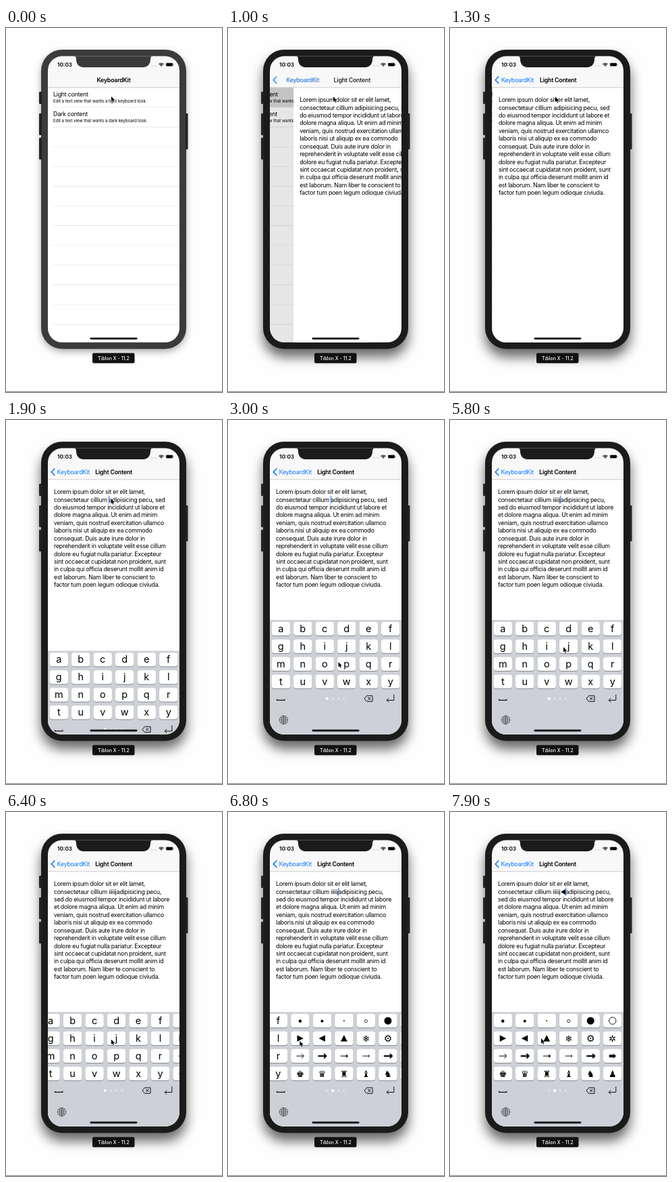
These frames come from a looping animation (320x537 px, 8 s). An HTML page with a canvas:

```html
<!DOCTYPE html>
<html lang="en">
<head>
<meta charset="utf-8">
<title>Keyboard demo</title>
<style>
html, body { margin: 0; width: 100%; height: 100%; overflow: hidden; background: #fefefe; }
canvas { display: block; width: 320px; height: 537px; }
</style>
</head>
<body>
<canvas id="stage"></canvas>
<script>
const LOOP = 8000;
const W = 320, H = 537;
const SCREEN = { x: 62, y: 41.6, w: 195, h: 422.2 };
const MID = 159.5;
const BODY = 8.84;
const BLUE = '#0a7aff';

const canvas = document.getElementById('stage');
const ctx = canvas.getContext('2d');
const dpr = window.devicePixelRatio || 1;
canvas.width = W * dpr;
canvas.height = H * dpr;

// Timeline, in ms
const ACTIVATE = 700, PUSH = 785, KEYBOARD_UP = 1723;
const DRAG_START = 6320, DRAG_END = 6600;
const EDITS = [3700, 3900, 4150, 4400, 4700, 5600, 7500];
const TYPED = 'iiiiij◀';
const POINTER = [
  [0, 156, 101], [1500, 156, 101.5], [1600, 155.5, 116], [1950, 155.5, 116],
  [2650, 163.5, 357], [3100, 163.5, 357], [3600, 138, 332], [5000, 138, 332],
  [5500, 168, 335], [DRAG_START, 168, 335], [DRAG_END, 108, 337], [7200, 101.5, 340],
  [7600, 101.5, 340], [7900, 135, 334]
];

const LINES = [
  'Lorem ipsum dolor sit er elit lamet,', '', '', '',
  'veniam, quis nostrud exercitation ullamco',
  'laboris nisi ut aliquip ex ea commodo',
  'consequat. Duis aute irure dolor in',
  'reprehenderit in voluptate velit esse cillum',
  'dolore eu fugiat nulla pariatur. Excepteur',
  'sint occaecat cupidatat non proident, sunt',
  'in culpa qui officia deserunt mollit anim id',
  'est laborum. Nam liber te conscient to',
  'factor tum poen legum odioque civiuda.'
];
const LETTERS = 'abcdefghijklmnopqrtuvwxy';

// Remaining distance (1 to 0) of a critically damped spring
function spring(ms) {
  const s = Math.max(0, ms) * 0.0145;
  return (1 + s) * Math.exp(-s);
}

const smooth = u => u * u * (3 - 2 * u);

function pointerAt(t) {
  const i = POINTER.findIndex(k => k[0] > t);
  if (i < 0) return POINTER.at(-1).slice(1);
  const [t0, x0, y0] = POINTER[i - 1], [t1, x1, y1] = POINTER[i];
  const u = smooth((t - t0) / (t1 - t0));
  return [x0 + (x1 - x0) * u, y0 + (y1 - y0) * u];
}

function setFont(size, weight, spacing) {
  ctx.font = `${weight} ${size}px Inter, "DejaVu Sans", sans-serif`;
  ctx.letterSpacing = spacing * size + 'px';
}

function text(str, x, y, { size = BODY, weight = 400, color = '#000', align = 'left', spacing = -0.027 } = {}) {
  setFont(size, weight, spacing);
  ctx.textAlign = align;
  ctx.fillStyle = color;
  ctx.fillText(str, x, y);
}

function box(x, y, w, h, r, color) {
  ctx.fillStyle = color;
  ctx.beginPath();
  ctx.roundRect(x, y, w, h, r);
  ctx.fill();
}

function stroke(d, color = '#111', width = 1) {
  ctx.strokeStyle = color;
  ctx.lineWidth = width;
  ctx.stroke(new Path2D(d));
}

function fill(d, color = '#000') {
  ctx.fillStyle = color;
  ctx.fill(new Path2D(d));
}

function disc(x, y, r, color = '#000') {
  ctx.fillStyle = color;
  ctx.beginPath();
  ctx.arc(x, y, r, 0, 7);
  ctx.fill();
}

function ring(x, y, r, width = 1) {
  ctx.strokeStyle = '#000';
  ctx.lineWidth = width;
  ctx.beginPath();
  ctx.arc(x, y, r, 0, 7);
  ctx.stroke();
}

function at(x, y, draw) {
  ctx.save();
  ctx.translate(x, y);
  draw();
  ctx.restore();
}

function withAlpha(alpha, draw) {
  ctx.save();
  ctx.globalAlpha = alpha;
  draw();
  ctx.restore();
}

function drawDevice(active) {
  const color = active ? '#1b1b1b' : '#3b3b3b';
  ctx.save();
  ctx.shadowColor = active ? 'rgba(0,0,0,.6)' : 'rgba(0,0,0,.32)';
  ctx.shadowBlur = (active ? 18 : 11) * dpr;
  ctx.shadowOffsetY = (active ? 12 : 4) * dpr;
  box(52, 32, 215, 441.4, 31, color);
  ctx.restore();
  box(49, 94, 4, 18, 1, '#222');
  box(49, 126, 4, 32, 1, '#222');
  box(49, 162, 4, 32, 1, '#222');
  box(266, 126, 3.5, 53, 1, '#222');
  return color;
}

function drawStatus(color) {
  fill('M100 41H218C215 42 214 43 214 46C214 53 210 58 203 58H115C108 58 104 53 104 46C104 43 103 42 100 41Z', color);
  text('10:03', 76, 57, { size: 8.2, weight: 600, spacing: 0 });
  for (let i = 0; i < 4; i++) disc(215.3 + i * 2.3, 55.8, 0.6, '#aaa');
  ctx.strokeStyle = '#000';
  ctx.lineWidth = 1.2;
  for (const r of [1, 3, 5]) {
    ctx.beginPath();
    ctx.arc(230, 57, r, -Math.PI * 0.75, -Math.PI * 0.25);
    ctx.stroke();
  }
  box(236.8, 51.3, 10.6, 5.4, 1.4, '#888');
  box(237.4, 51.9, 9.4, 4.2, 1, '#000');
  box(247.8, 53, 0.8, 2, 0.4, '#888');
}

function drawList(pressed) {
  box(62, 88, 195, 376, 0, '#fff');
  if (pressed) box(62, 88, 195, 29, 0, '#d9d9d9');
  for (let i = 1; i <= 12; i++) box(70, 87.6 + i * 29.1, 187, 0.6, 0, '#dededf');
  ['light', 'dark'].forEach((look, i) => {
    const y = 101 + i * 29.1;
    text(look[0].toUpperCase() + look.slice(1) + ' content', 70, y);
    text(`Edit a text view that wants a ${look} keyboard look.`, 70, y + 9, { size: 6.24, spacing: -0.01 });
  });
}

function drawEditor(t) {
  box(62, 88, 195, 376, 0, '#fff');
  const count = EDITS.filter(e => e <= t).length;
  const wrapped = count >= 4;
  const before = 'consectetaur cillium ' + TYPED.slice(0, count);
  const lines = LINES.slice();
  lines[1] = before + 'adipisicing pecu,' + (wrapped ? '' : ' sed');
  lines[2] = (wrapped ? 'sed ' : '') + 'do eiusmod tempor incididunt ut labore' + (wrapped ? '' : ' et');
  lines[3] = (wrapped ? 'et ' : '') + 'dolore magna aliqua. Ut enim ad minim';
  lines.forEach((line, i) => text(line, 71, 109.2 + i * 11.42));

  const lastEdit = count ? EDITS[count - 1] : KEYBOARD_UP;
  if (t >= KEYBOARD_UP && (t - lastEdit) % 1000 < 550) {
    box(71 + ctx.measureText(before).width - 0.3, 111.5, 1.1, 12, 0.4, '#3f70ee');
  }
}

function drawNavBar(remaining) {
  box(62, 41, 195, 47, 0, '#f8f8f8');
  box(62, 87.6, 195, 0.6, 0, '#bdbdc0');
  const shown = 1 - remaining;
  withAlpha(remaining, () =>
    text('KeyboardKit', MID - 58 * shown, 79.5, { weight: 600, align: 'center' }));
  withAlpha(shown, () => {
    stroke('M72.4 71.5L67.2 76.7L72.4 81.9', BLUE, 1.6);
    text('KeyboardKit', 75.6 + 58 * remaining, 79.6, { color: BLUE });
    text('Light Content', MID + 135 * remaining, 79.5, { weight: 600, align: 'center' });
  });
}

function arrow(length, width, head) {
  const e = length / 2;
  stroke(`M${-e} 0H${e - 0.5}M${e - head} ${-head}L${e} 0L${e - head} ${head}`, '#000', width);
}

const glyph = (char, size = 13) => () =>
  text(char, 0, size * 0.36, { size, align: 'center', spacing: 0 });

const SYMBOLS = [
  () => disc(0, 0.5, 2.2),
  () => disc(0, 0.5, 2),
  () => disc(0, 0, 0.9),
  () => ring(0, 0.5, 2.1, 0.8),
  () => disc(0, 0, 5.5),
  () => ring(0, 0, 5.2, 0.9),
  () => fill('M-4.5 -4.7L5 0L-4.5 4.7Z'),
  () => fill('M4.5 -4.7L-5 0L4.5 4.7Z'),
  () => fill('M-4.9 4.5L0 -5L4.9 4.5Z'),
  glyph('❄'), glyph('⚙', 14), glyph('✲'),
  () => arrow(11, 1, 3.4),
  () => arrow(12, 1.9, 3.3),
  () => arrow(10.5, 1.2, 2.2),
  () => arrow(10.5, 0.9, 2),
  () => arrow(12, 2.1, 3),
  () => fill('M-5 -2H1V-3.6L5.5 0L1 3.6V2H-5Z'),
  ...[...'♚♛♜♝♞♟'].map(c => glyph(c))
];

function drawPage(drawKey) {
  for (let i = 0; i < 24; i++) {
    at(78.25 + (i % 6) * 32.5, 308 + Math.floor(i / 6) * 26, () => {
      box(-13.7, -9.2, 27.4, 20.2, 4, '#878b92');
      box(-13.7, -10.2, 27.4, 20.2, 4, '#fff');
      drawKey(i);
    });
  }
}

function pageOffset(t) {
  if (t < DRAG_START) return 0;
  const dragged = 168 - pointerAt(Math.min(t, DRAG_END))[0];
  return 195 - (195 - dragged) * spring(t - DRAG_END);
}

function drawKeyboard(t) {
  box(62, 295, 195, 169, 0, '#cdd0d6');
  const offset = pageOffset(t);
  at(-offset, 0, () => drawPage(i =>
    text(LETTERS[i], 0, 4.6, { size: 14.5, align: 'center', spacing: 0 })));
  if (offset > 0) at(195 - offset, 0, () => drawPage(i => SYMBOLS[i]()));

  stroke('M72.6 411.8V413.4H83.8V411.8', '#111', 1.3);
  const page = offset > 97 ? 1 : 0;
  for (let i = 0; i < 4; i++) {
    const current = i === page;
    disc(146.7 + i * 8.4, 411, current ? 2.1 : 1.7, current ? '#fff' : '#dfe1e5');
  }
  stroke('M202 411L205.5 406.8H214V415.2H205.5ZM207.3 409L211.3 413M211.3 409L207.3 413');
  stroke('M245.8 405V413.5H235.2M238.2 410.5L235.2 413.5L238.2 416.5');
  stroke('M76.3 442.5A6.2 6.2 0 1 0 88.7 442.5A6.2 6.2 0 1 0 76.3 442.5H88.7M82.5 436.3V448.7' +
    'M82.5 436.3C78.6 440 78.6 445 82.5 448.7C86.4 445 86.4 440 82.5 436.3M77.6 439.2Q82.5 441.2 87.4 439.2M77.6 445.8Q82.5 443.8 87.4 445.8', '#333', 0.7);
}

function drawPointer(t) {
  at(...pointerAt(t), () => {
    const shape = 'M0 0V7.6L1.7 6L2.9 8.7L4.1 8.2L3 5.5H5.4Z';
    stroke(shape, '#fff', 1);
    fill(shape);
  });
}

function draw(t) {
  ctx.setTransform(dpr, 0, 0, dpr, 0, 0);
  box(0, 0, W, H, 0, '#fefefe');
  box(0, 536, W, 1, 0, '#858585');
  const active = t >= ACTIVATE;
  const color = drawDevice(active);
  box(128, 479.5, 62.5, 15, 2, '#111');
  text('Tiblon X - 11.2', MID, 489.7, { size: 7, weight: 500, color: '#fff', align: 'center', spacing: 0 });

  ctx.save();
  ctx.beginPath();
  ctx.roundRect(SCREEN.x, SCREEN.y, SCREEN.w, SCREEN.h, 21);
  ctx.clip();
  const remaining = spring(t - PUSH);
  at(-58.5 * (1 - remaining), 0, () => drawList(active));
  box(62, 88, 195, 376, 0, `rgba(0,0,0,${0.12 * (1 - remaining)})`);
  at(SCREEN.w * remaining, 0, () => drawEditor(t));
  drawNavBar(remaining);
  if (t >= KEYBOARD_UP) at(0, 168 * spring(t - KEYBOARD_UP), () => drawKeyboard(t));
  drawStatus(color);
  box(124.5, 456.7, 70, 2.7, 1.35, '#000');
  ctx.restore();

  drawPointer(t);
}

function tick() {
  draw(performance.now() % LOOP);
  requestAnimationFrame(tick);
}
tick();
</script>
</body>
</html>
```
